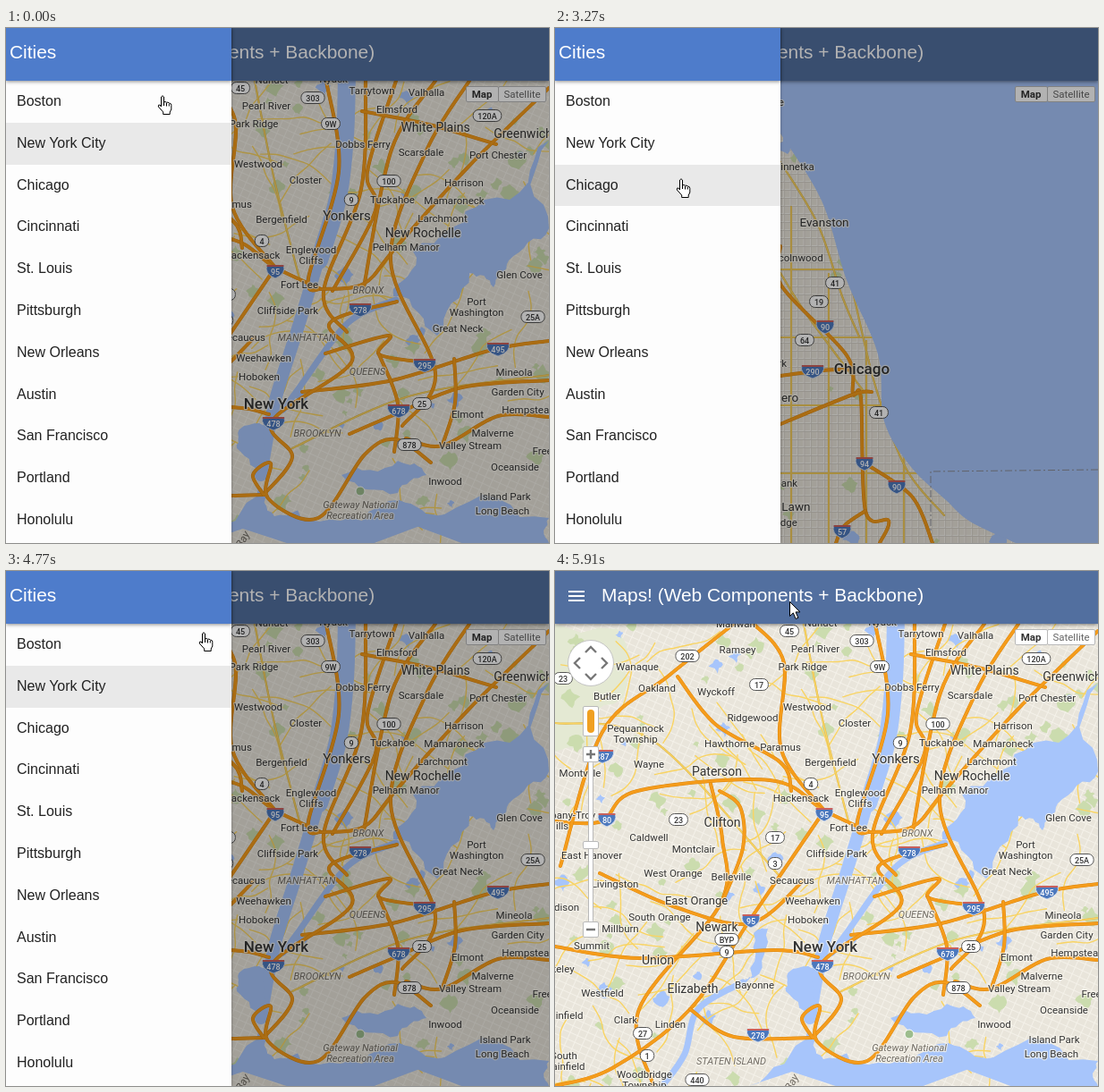
These frames come from a looping animation (607x576 px, 6300 ms). An HTML page:

```html
<!DOCTYPE html>
<html lang="en">
<head>
<meta charset="utf-8">
<title>Maps</title>
<style>
  html, body { margin: 0; width: 100%; height: 100%; overflow: hidden; background: #e9e5db; }
  #stage { position: absolute; left: 0; top: 0; width: 607px; height: 576px; overflow: hidden; }
  svg { position: absolute; left: 0; top: 0; overflow: visible; }
  .map text { font-family: Roboto, sans-serif; fill: #333; text-anchor: middle; }
  .label { paint-order: stroke; stroke: #f7f4ec; stroke-opacity: .75; stroke-width: 2.4px; stroke-linejoin: round; }
  .map .area { font-style: italic; fill: #6f6a62; }
  #bar, #drawer header { position: absolute; left: 0; top: 0; height: 59px; color: #fff;
    font: 20.9px/54px "Liberation Sans", Arial, sans-serif; white-space: pre; }
  #bar { width: 607px; background: #526f9f; box-shadow: 0 1px 4px rgba(0,0,0,.5); }
  #bar span { position: absolute; left: 52px; }
  #bar i { position: absolute; left: 15px; width: 18px; height: 2px; background: #fff; }
  #scrim { position: absolute; inset: 0; background: #000; }
  #drawer { position: absolute; left: 0; top: 0; width: 252px; height: 576px; background: #fdfdfd;
    box-shadow: 0 0 3px rgba(0,0,0,.35); }
  #drawer header { width: 248px; padding-left: 4px; background: #4e7ccb; box-shadow: 0 1px 4px rgba(0,0,0,.45); }
  #drawer p { position: absolute; left: 0; margin: 0; padding-left: 12px; width: 240px; height: 46.8px;
    font: 16px/45px "Liberation Sans", Arial, sans-serif; color: #222; }
</style>
</head>
<body>
<div id="stage">
  <svg id="maps" width="607" height="576">
    <defs>
      <pattern id="streets" width="9" height="8" patternUnits="userSpaceOnUse" patternTransform="rotate(24)">
        <path d="M0 .5H9M.5 0V8" stroke="#f4f1e9" fill="none"/>
      </pattern>
      <pattern id="blocks" width="7.5" height="9" patternUnits="userSpaceOnUse">
        <path d="M0 .5H8M.5 0V9" stroke="#f8f6f0" fill="none"/><path d="M1.5 0V9M0 1.5H8" stroke="#d3cfc6" stroke-width=".8"/>
      </pattern>
    </defs>
  </svg>
  <div id="bar"><i style="top:22px"></i><i style="top:27px"></i><i style="top:32px"></i><span>Maps! (Web Components + Backbone)</span></div>
  <div id="scrim"></div>
  <div id="drawer"></div>
  <svg width="607" height="576">
    <g id="cursor" fill="#fff" stroke="#000" stroke-linejoin="round">
      <path id="hand" d="M-1.5 13V2q1.5-2.5 3 0v6q1.5-1.2 3 .3 1.6-.8 2.7.7 2.6 0 2.6 2.3v4.7l-1.6 3v2.5H.7V19L-4.7 13q-.4-2.6 1.7-2zM1.5 8v4M4.5 9v3.5M7.3 10v2.5"/>
      <path id="arrow" d="M.5.5v16l3.8-3.6 2.8 6.6 2.8-1.2-2.8-6.4h4.9z"/>
    </g>
  </svg>
</div>
<script>
const $ = id => document.getElementById(id);
const SVG = 'http://www.w3.org/2000/svg';
const ORANGE = '#f59c1b', YELLOW = '#f9d463', WATER = '#a7c5fb', PARK = '#cbdcae', LAND = '#e9e5db';

function add(parent, tag, attrs, text) {
  const node = parent.appendChild(document.createElementNS(SVG, tag));
  for (const key in attrs) node.setAttribute(key, attrs[key]);
  if (text) node.textContent = text;
  return node;
}

function random(seed) {
  return () => {
    seed = (seed * 1664525 + 1013904223) >>> 0;
    return seed / 4294967296;
  };
}

const points = text => text.split(' ').map(s => s.split(',').map(Number));

// Smooth path through the points
function curve(p) {
  const at = i => p[Math.max(0, Math.min(p.length - 1, i))];
  let d = 'M' + p[0];
  for (let i = 0; i < p.length - 1; i++) {
    const [a, b, c, e] = [at(i - 1), at(i), at(i + 1), at(i + 2)];
    d += `C${b.map((v, k) => v + (c[k] - a[k]) / 6)} ${c.map((v, k) => v - (e[k] - b[k]) / 6)} ${c}`;
  }
  return d;
}

// Natural shoreline: split every side at a randomly shifted midpoint
function shore(p, rnd, depth = 3) {
  if (!depth) return p;
  const out = [];
  p.forEach(([x, y], i) => {
    const [u, v] = p[(i + 1) % p.length];
    const shift = Math.hypot(u - x, v - y) < 130 ? (rnd() - .5) * .45 : 0;
    out.push([x, y], [(x + u) / 2 + (y - v) * shift, (y + v) / 2 + (u - x) * shift]);
  });
  return shore(out, rnd, depth - 1);
}

function createMap(streets, seed) {
  const g = add($('maps'), 'g', { class: 'map' });
  const rnd = random(seed);
  const line = (p, stroke, width) => add(g, 'path',
    { d: curve(p), fill: 'none', stroke, 'stroke-width': width, 'stroke-linecap': 'round', 'stroke-linejoin': 'round' });
  for (const fill of [LAND, `url(#${streets})`]) add(g, 'rect', { y: 59, width: 607, height: 517, fill });
  return {
    g,
    area(text, fill = WATER) { add(g, 'path', { d: `M${shore(points(text), rnd).join('L')}Z`, fill }); },
    river(text, width) { line(points(text), WATER, width); },
    minor(text) { line(points(text), '#d9b145', 2.2); line(points(text), YELLOW, 1.5); },
    road(text) { line(points(text), '#d8840f', 4); line(points(text), ORANGE, 3.2); },
    // Small parks and ponds, then wandering side roads
    scatter(patches, roads, left = 0) {
      const spot = () => [left + rnd() * (607 - left), 59 + rnd() * 517];
      for (let i = 0; i < patches; i++) {
        const [x, y] = spot(), r = 3 + rnd() * 8;
        const blob = [[x - r, y], [x, y - r], [x + r, y - 2], [x + 2, y + r]];
        add(g, 'path', { d: `M${shore(blob, rnd, 2).join('L')}Z`, fill: i % 5 ? PARK : WATER });
      }
      for (let i = 0; i < roads; i++) {
        let [x, y] = spot(), angle = rnd() * 2 * Math.PI;
        const p = [];
        for (let k = 0; k < 6; k++) {
          p.push([x, y]);
          angle += rnd() - .5;
          x += 18 * Math.cos(angle);
          y += 18 * Math.sin(angle);
        }
        line(p, YELLOW, 1.4);
      }
    },
    labels(size, list, cls = '') {
      for (const item of list.split(';')) {
        const [, name, x, y] = item.match(/^(.*) (-?\d+) (\d+)$/);
        name.split('/').forEach((part, i) => add(g, 'text',
          { x, y: +y + size * .35 + 12 * i, 'font-size': size, class: 'label ' + cls, 'font-weight': size > 16 ? 500 : 400 }, part));
      }
    },
    signs(list, interstate) {
      for (const item of list.split(';')) {
        const [name, x, y] = item.split(' ');
        const s = add(g, 'g', { transform: `translate(${x} ${y})` });
        const w = 5 + name.length * 2.7;
        if (interstate) {
          add(s, 'path', { d: `M${1 - w}-7Q0-5 ${w - 1}-7Q${w + 2} 3 0 8Q${-w - 2} 3 ${1 - w}-7Z`, fill: '#4c78bd', stroke: '#e8ecf4', 'stroke-width': .8 });
          add(s, 'path', { d: `M${1 - w}-6H${w - 1}`, stroke: '#c9605c', 'stroke-width': 2 });
        } else {
          add(s, 'rect', { x: -w, y: -6.5, width: 2 * w, height: 13, rx: 6, fill: '#fff', stroke: '#555' });
        }
        add(s, 'text', { y: 3.5, 'font-size': 9, 'font-weight': 500, style: interstate ? 'fill:#fff' : '' }, name);
      }
    }
  };
}

function newYork() {
  const m = createMap('streets', 17);
  m.area('-90,50 70,65 80,130 30,200 -90,210', '#e4e9d3');
  m.scatter(150, 120);
  m.area('607,126 535,192 455,250 433,300 482,344 518,274 545,290 562,260 607,224');
  m.river('381,50 379,120 371,190 350,260', 20);
  m.river('352,250 328,330 300,420 285,500', 14);
  m.area('305,430 294,488 283,510 258,470 266,445');
  m.area('216,576 283,512 300,546 350,552 440,528 490,544 607,548 607,576');
  m.area('375,500 438,484 470,500 438,520');
  m.area('222,405 238,400 222,455 208,464');
  m.river('436,304 382,330 328,402 310,427', 7);
  m.river('210,460 160,490 145,540 120,576', 7);

  m.minor('278,59 300,170 328,280');
  m.minor('0,170 110,190 250,340');
  m.minor('320,470 450,412 607,388');
  m.road('222,59 256,103 253,200 301,268');
  m.road('0,280 52,280 92,246 240,234 301,268 352,292');
  m.road('200,59 126,118 53,180 6,330');
  m.road('137,118 180,172 252,214 264,246');
  m.road('174,238 187,300 185,372 94,490 110,576');
  m.road('50,338 132,375 218,394 278,346');
  m.road('301,268 218,390 151,490 64,556 0,576');
  m.road('0,420 94,433 245,424 294,432');
  m.road('184,246 207,264 210,310 187,370');
  m.road('151,490 200,521 288,522');
  m.road('358,59 372,160 338,280 352,292');
  m.road('402,59 397,180 355,295 381,340');
  m.road('436,59 404,160 413,204 365,294');
  m.road('480,59 431,136 400,290');
  m.road('398,93 473,108 548,130');
  m.road('607,67 517,155 437,244 400,286 352,292');
  m.road('518,59 470,137 430,260 480,386 443,445');
  m.road('607,350 543,360 432,394 331,407');
  m.road('437,306 362,330 386,374 298,439 320,480 288,522');
  m.road('357,364 428,344 417,365 468,374');
  m.road('417,365 438,420 434,474');
  m.road('288,522 276,500 296,487 293,526 349,548 401,477 436,460 475,486');
  m.road('447,459 488,467 550,434 607,435');
  m.road('384,454 433,433 510,402 607,394');
  m.road('488,466 502,419 501,370');

  const small = list => m.labels(11.5, list);
  small('Nanuet 297 58;Tarrytown 409 70;Valhalla 470 72;Elmsford 437 91;Pearl River 291 87;Ramsey 204 88;Park Ridge 277 107;Dobbs Ferry 399 130;Scarsdale 464 139;Port Chester 550 142;Wanaque 92 107;Oakland 114 131;Wyckoff 180 135;Westwood 282 152;Ridgewood 221 164;Closter 335 170');
  small('Harrison 512 173;Mamaroneck 501 193;Tuckahoe 432 192;Larchmont 488 213;Butler 58 140;Pequannock/Township 90 176;Hawthorne 195 193;Paramus 252 197;Bergenfield 308 214;Englewood/Cliffs 341 248;Pelham Manor 447 245;Hackensack 275 254;Wayne 105 216;Montville 28 226');
  small('Glen Cove 574 276;Port/Washington 526 306;Great Neck 505 336;Fort Lee 328 287;Cliffside Park 315 316;Caldwell 105 298;Montclair 155 311;East Hanover 41 318;West Orange 132 338;Belleville 197 342;Secaucus 265 346;Livingston 67 350;Weehawken 288 369;Hoboken 283 390;South Orange 117 387');
  small('Mineola 568 385;Garden City 572 407;Elmont 516 432;Hempstead 584 427;Malverne 544 453;Valley Stream 519 467;Freeport 610 473;Oceanside 569 491;Inwood 491 507;Island Park 558 524;Long Beach 555 540;Millburn 73 400;Summit 41 419;Westfield 53 472;Bayonne 223 463;Clark 79 502;Linden 129 507;Woodbridge/Township 100 563');
  small('Parsippany-Troy/Hills 4 273;Madison 5 376;Berkeley 0 445;Plainfield 8 497;South/Plainfield 10 542;Mahwah 202 59;Nyack 366 57');
  m.labels(14, 'White Plains 480 111;Greenwich 578 118;Paterson 181 224;New Rochelle 466 229;Clifton 187 281;Newark 181 398;Elizabeth 154 467;Union 115 435');
  m.labels(13, 'East Orange 158 368');
  m.labels(15, 'Yonkers 381 210');
  m.labels(17, 'New York 302 420');
  m.labels(11, 'MANHATTAN 336 346;BRONX 405 293;QUEENS 404 384;BROOKLYN 348 453;STATEN ISLAND 197 548;Gateway National/Recreation Area 396 533', 'area');
  add(m.g, 'text', { transform: 'translate(268 574) rotate(-60)', 'font-size': 12, class: 'area' }, 'Bay');
  add(m.g, 'circle', { cx: 396, cy: 518, r: 5, fill: '#9dbd8d', stroke: '#fff' });
  m.signs('45 262 67;303 343 78;9W 363 107;120A 538 98;100 428 171;9 386 192;202 148 95;17 228 127;4 286 238;17 246 298;23 138 278;3 246 327;25A 589 323;25 465 420;878 451 466;BYP 192 412;9 192 426;27 98 517;1 103 542;440 159 569;23 9 120');
  m.signs('95 301 272;278 396 315;495 550 359;295 468 377;678 439 428;478 299 442;95 219 391;278 227 519;80 58 278;287 53 207', true);
  return m.g;
}

function boston() {
  const m = createMap('streets', 41);
  m.scatter(90, 55, 252);
  m.area('607,168 545,200 448,225 436,250 480,278 426,302 390,342 350,348 370,395 318,432 344,452 335,494 394,522 436,516 430,474 456,508 552,548 576,570 607,576');
  m.area('397,347 418,348 427,357 412,361', LAND);
  m.area('408,238 424,228 440,238 420,250');
  m.area('590,110 607,92 607,140 590,130');
  m.river('585,90 548,128 530,132', 4);
  m.river('252,398 300,414 318,408', 6);
  m.minor('420,59 382,155 332,282 330,335');
  m.minor('252,330 305,420 280,465 290,515 252,550');
  m.minor('330,545 372,530 480,550 545,576');
  m.road('372,59 363,134 375,180 356,260');
  m.road('252,278 296,262 325,267 382,253 424,207 524,190 556,160 584,159');
  m.road('252,264 272,312 276,375 307,430 302,462 330,517 328,546 297,576');
  m.road('330,546 353,555 366,576');
  m.road('330,335 335,351 325,380 300,416');
  m.road('252,405 264,427 332,432 334,395');
  m.labels(11.5, 'Georgetown 360 58;Ipswich 463 103;Boxford 351 121;Topsfield 386 145;Hamilton 463 146;Wenham 428 178;Middleton 336 187;Danvers 398 206;North Reading 290 206;Manchester-by-the-Sea 518 204;Beverly 436 223;Gloucester 593 166;Andover 249 124;Reading 279 255;Wakefield 296 277;Marblehead 452 281;Saugus 340 315;Nahant 408 353');
  m.labels(11.5, 'Revere 339 371;Winthrop 362 401;Winchester 250 328;Hull 416 476;Hingham 429 535;Cohasset 491 535;Milton 300 527');
  m.labels(12.5, 'Salem 424 261');
  m.labels(13.5, 'Lynn 385 313;Medford 272 361;Somerville 276 391;Brookline 262 447;Quincy 346 524;Weymouth 391 558');
  m.labels(17, 'Boston 304 420');
  m.signs('114 286 139;133 503 132;127 587 130;35 393 180;125 259 178;1 359 239;129 437 298;1A 372 339;16 308 376;138 268 539;28 297 549;3A 377 533;3A 507 568;1 297 571');
  m.signs('95 373 77', true);
  return m.g;
}

function chicago() {
  const m = createMap('blocks', 9);
  m.scatter(50, 0, 252);
  for (let i = 0; i < 4; i++) {
    m.minor(`252,${270 + i * 76} 420,${270 + i * 76}`);
    m.minor(`${264 + i * 42},${200 + i * 75} ${264 + i * 42},576`);
  }
  m.minor('252,150 294,220 321,300 340,345');
  m.minor('252,274 281,320 344,405');
  m.minor('332,290 358,400 392,492 435,545');
  const coast = '252,118 298,193 326,282 361,365 368,440 398,491 437,528 464,552 515,576';
  add(m.g, 'path', { d: curve(points(coast)) + 'L607 576V59H252Z', fill: WATER });
  add(m.g, 'path', { d: 'M607 494L420 496V576', fill: 'none', stroke: '#8b8d97', 'stroke-dasharray': '8 3 2 3' });
  m.road('252,244 253,288 326,366 333,409 342,414 347,540 373,551 363,576');
  m.road('252,389 299,383 331,382');
  m.road('252,443 333,410 354,407');
  m.road('345,486 399,524 422,576');
  m.road('347,540 323,557 314,576');
  m.labels(11.5, 'Skokie 239 83;Winnetka 266 155;Lincolnwood 267 257;Oak Park 236 375;Burbank 250 509;Oakridge 248 553');
  m.labels(13.5, 'Evanston 301 217;Cicero 253 413;Oak Lawn 256 535');
  m.labels(17, 'Chicago 343 381');
  m.signs('41 313 285;19 295 306;64 279 349;41 362 430');
  m.signs('90 302 334;290 288 384;94 346 487;90 382 513;57 321 563', true);
  return m.g;
}

function controls() {
  const g = add($('maps'), 'g', { class: 'map' });
  const box = (x, y, width, height) => add(g, 'rect', { x, y, width, height, rx: 1.5, fill: '#fff', stroke: '#b9b9b9' });
  const strokes = d => add(g, 'path', { d, fill: 'none', stroke: '#777', 'stroke-width': 2.4 });
  add(g, 'circle', { cx: 40, cy: 103, r: 25.5, fill: '#fff', stroke: '#c4c4c4' });
  strokes('M34 91l6-6 6 6M34 115l6 6 6-6M28 97l-6 6 6 6M52 97l6 6-6 6');
  box(31.5, 151.5, 17, 33);
  add(g, 'rect', { x: 36, y: 155, width: 8, height: 26, rx: 4, fill: '#f0a022' });
  box(37.5, 213, 5, 180);
  box(31.5, 196.5, 17, 17);
  box(31.5, 392.5, 17, 17);
  box(31.5, 302.5, 17, 8);
  strokes('M35 205h10M40 200v10M35 401h10');
  box(514.5, 65.5, 36, 17);
  box(550.5, 65.5, 53, 17);
  add(g, 'text', { x: 532, y: 78, 'font-size': 11.5, 'font-weight': 700 }, 'Map');
  add(g, 'text', { x: 577, y: 78, 'font-size': 11.5, style: 'fill:#666' }, 'Satellite');
}

const maps = [boston(), newYork(), chicago()];
controls();

const drawer = $('drawer');
const rows = 'Boston,New York City,Chicago,Cincinnati,St. Louis,Pittsburgh,New Orleans,Austin,San Francisco,Portland,Honolulu'
  .split(',').map((name, i) => {
    const row = drawer.appendChild(document.createElement('p'));
    row.textContent = name;
    row.style.top = 59 + 46.8 * i + 'px';
    return row;
  });
drawer.appendChild(document.createElement('header')).textContent = 'Cities';

const LOOP = 6300, STEP = 30, CLOSE = 5556;
const choices = [[0, 1], [1770, 0], [3060, 2], [4320, 1]];
// time, x, y of the pointer tip
const pointer = [
  [0, 175, 75], [2040, 175, 75], [2700, 142, 163], [2760, 141, 168], [3420, 141, 168], [3990, 111, 135],
  [4350, 111, 135], [4770, 221, 68], [4890, 244, 54], [4950, 244, 54], [5130, 262, 34], [LOOP, 262, 34]
];
const ease = p => (1 - Math.cos(Math.PI * Math.max(0, Math.min(1, p)))) / 2;

function render(time) {
  const t = Math.floor(time / STEP) * STEP;
  const city = choices.filter(c => c[0] <= t).pop()[1];
  maps.forEach((map, i) => map.style.display = i === city ? '' : 'none');
  rows.forEach((row, i) => row.style.background = i === city ? '#e9e9e9' : '');

  const next = pointer.findIndex(k => k[0] > t);
  const [a, b] = [pointer[next - 1], pointer[next]];
  const p = (t - a[0]) / (b[0] - a[0]);
  const q = b[0] - a[0] > 500 ? ease(p) : p;
  const [x, y] = [1, 2].map(k => Math.round(a[k] + (b[k] - a[k]) * q));
  $('cursor').setAttribute('transform', `translate(${x} ${y})`);
  $('hand').style.display = y >= 59 ? '' : 'none';
  $('arrow').style.display = y < 59 ? '' : 'none';

  const closed = ease((t - CLOSE) / 300);
  drawer.style.transform = `translateX(${Math.round(-252 * closed)}px)`;
  drawer.style.visibility = closed === 1 ? 'hidden' : '';
  $('scrim').style.opacity = .3 * (1 - ease((t - CLOSE) / 354));
}

const start = performance.now();
function tick() {
  render((performance.now() - start) % LOOP);
  requestAnimationFrame(tick);
}
tick();
</script>
</body>
</html>
```
